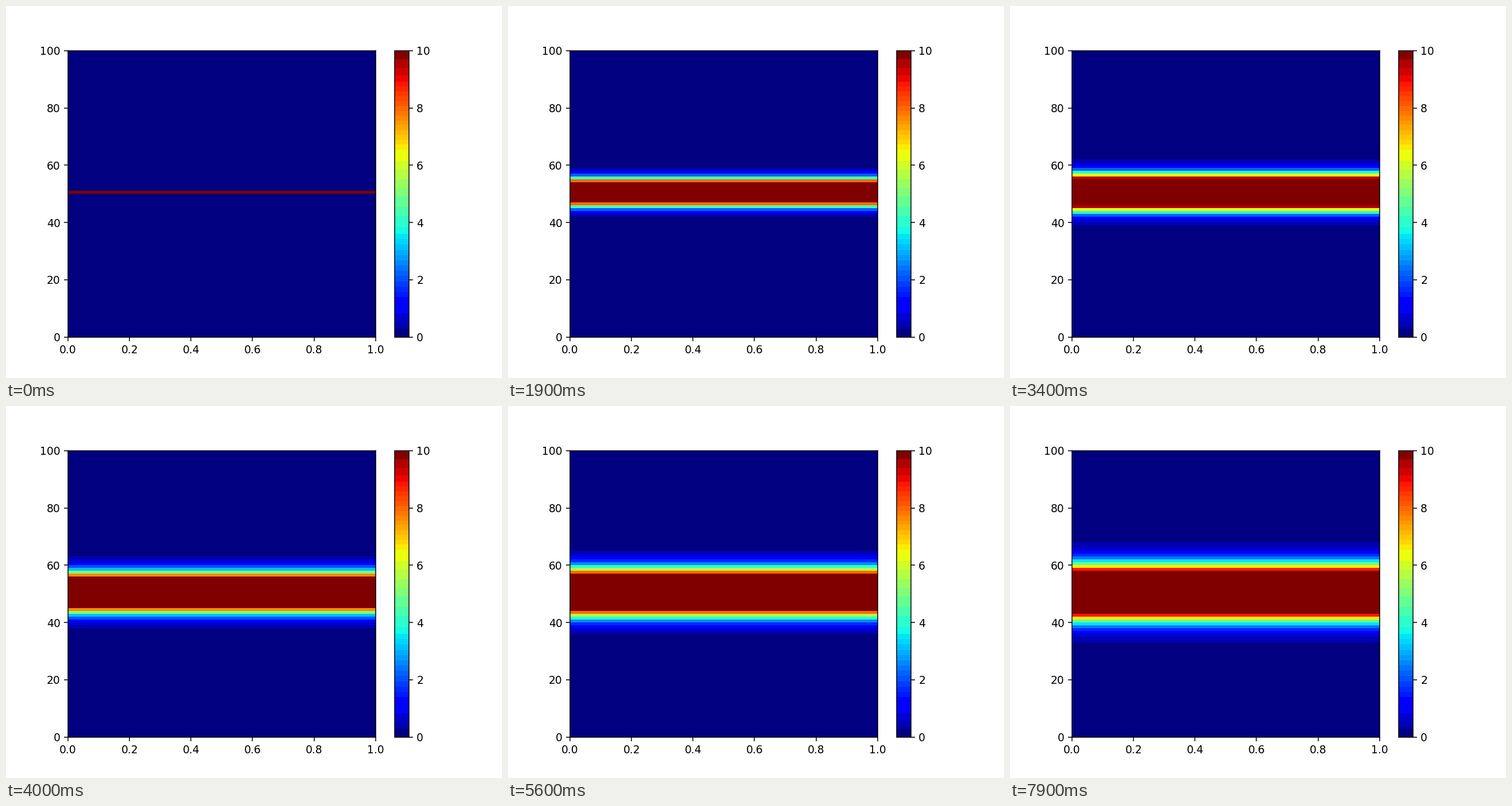
A matplotlib script for the animation above (8000 ms loop, 864 px wide and 648 px high).

```python
import numpy as np
import matplotlib.pyplot as plt
from matplotlib.animation import FuncAnimation
from matplotlib.colors import ListedColormap

ROWS, CENTER = 100, 50
FRAMES, INTERVAL = 80, 100
RATE = 0.25      # diffusion number per frame
SOURCE = 44.5    # level the middle row settles at
V_MAX = 10


def banded_jet(samples=500):
    """Jet reduced to flat bands of uneven height."""
    edges = np.concatenate([
        [0, 0.3, 0.57, 0.85],
        np.linspace(1.4, 3.6, 13),
        [3.85, 4.25, 4.55, 4.9, 5.2, 5.5, 5.85, 6.15],
        np.linspace(6.55, 8.93, 15),
        [9.15, 9.4, 9.7, V_MAX],
    ])
    mids = (edges[:-1] + edges[1:]) / 2
    mids[0], mids[-1] = 0, V_MAX
    values = (np.arange(samples) + 0.5) / samples * V_MAX
    band = np.searchsorted(edges, values, side="right") - 1
    return ListedColormap(plt.get_cmap("jet")(mids[band] / V_MAX))


def diffuse():
    """Implicit 1D diffusion away from a held middle row, one step per frame."""
    system = (1 + 2 * RATE) * np.eye(ROWS)
    system -= RATE * (np.eye(ROWS, k=1) + np.eye(ROWS, k=-1))
    system[CENTER] = 0
    system[CENTER, CENTER] = 1
    step = np.linalg.inv(system)

    level = np.zeros(ROWS)
    level[CENTER] = SOURCE
    profiles = [level]
    for n in range(1, FRAMES):
        level = level.copy()
        level[CENTER] = SOURCE * (1 - 0.5 ** n)
        level = step @ level
        profiles.append(level)
    return profiles


profiles = diffuse()

plt.rcParams["font.family"] = "DejaVu Sans"
fig, ax = plt.subplots(figsize=(6.4, 4.8), dpi=135)
mesh = ax.pcolormesh([0, 1], np.arange(ROWS + 1), profiles[0][:, None],
                     cmap=banded_jet(), vmin=0, vmax=V_MAX)
fig.colorbar(mesh, ax=ax)


def update(frame):
    mesh.set_array(profiles[frame][:, None])
    return [mesh]


anim = FuncAnimation(fig, update, frames=FRAMES, interval=INTERVAL,
                     repeat=True, repeat_delay=0)
plt.show()
```
